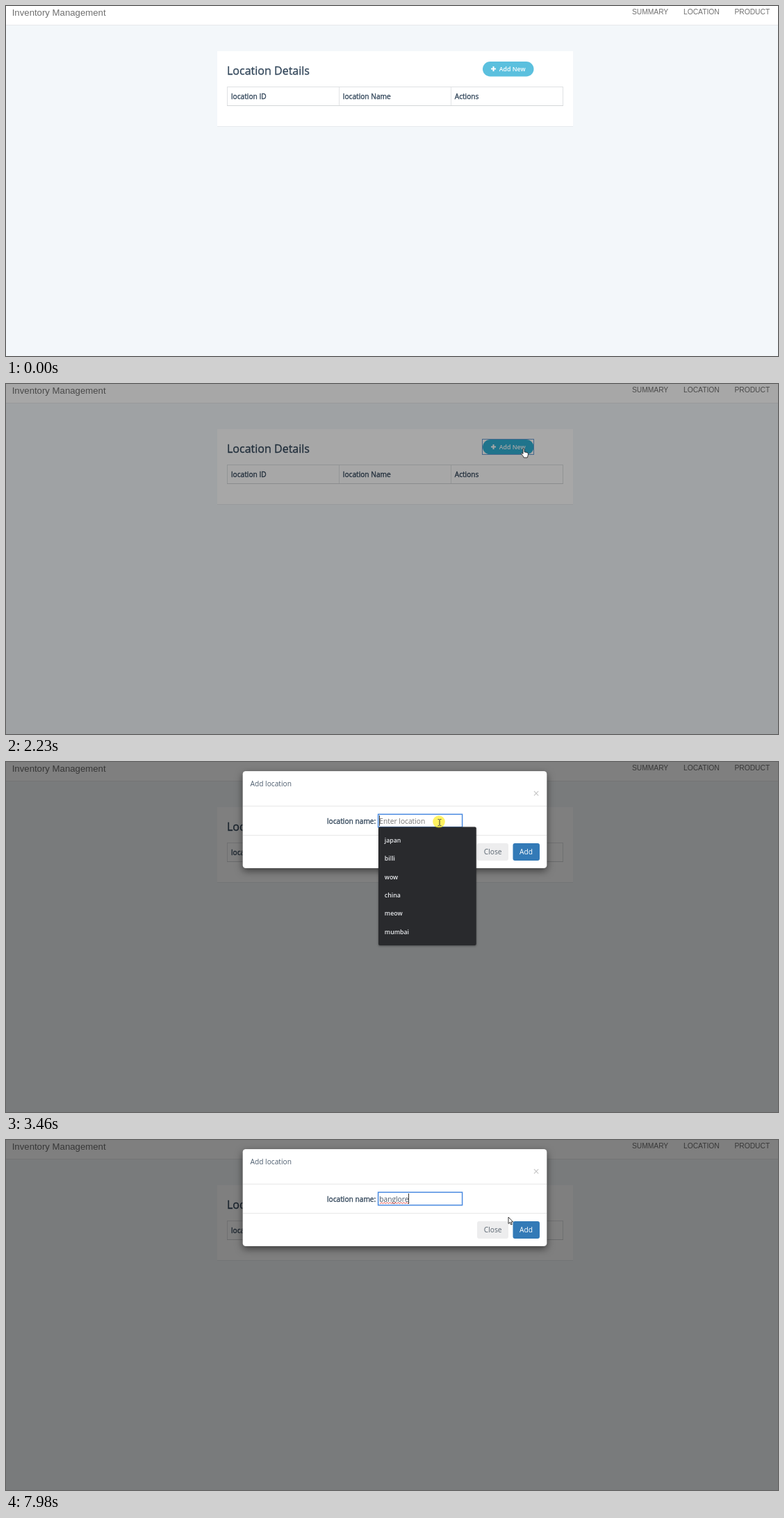
These frames come from a looping animation (1111x504 px, 8 s). An HTML page with a canvas:

```html
<!DOCTYPE html>
<html lang="en">
<head>
<meta charset="utf-8">
<title>Inventory Management</title>
<style>
  html, body { margin: 0; width: 100%; height: 100%; overflow: hidden; background: #f3f7fa; }
  canvas { display: block; }
</style>
</head>
<body>
<canvas id="stage" width="1111" height="504"></canvas>
<script>
const ctx = document.getElementById('stage').getContext('2d');
const LOOP = 8000;
const SANS = '"Open Sans", sans-serif';
const ARIAL = '"Liberation Sans", Arial, sans-serif';
const BASE = 10.2;
const INK = '#33475b';

const TYPED = [[4320, 'b'], [4470, 'ba'], [4620, 'ban'], [5170, 'bang'],
  [6030, 'bangl'], [6410, 'banglo'], [6730, 'banglor'], [6970, 'banglore']];
const CARET_OFF = [[4010, 4320], [5630, 6030], [7430, 7980]];
const SUGGESTIONS = ['japan', 'billi', 'wow', 'china', 'meow', 'mumbai'];
const FILTERED = ['billi', 'bhopal', 'bihar'];

const HAND = new Path2D('M-1 1q0-1.4 1-1.4q1 0 1 1.4v3.8l3.9.9q1.7.4 1.6 2l-.5 2.9-.8 2.4h-5' +
  'l-.8-1.8-2.6-3.3q-.6-1.2.5-1.6l1.7 1.3z');
const ARROW = new Path2D('M0 0V9.5L2.2 7.5 3.8 11 5.3 10.4 3.8 7H6.7Z');

const within = (t, a, b) => t >= a && t < b;
const clamp = v => Math.min(1, Math.max(0, v));
const smooth = u => u * u * (3 - 2 * u);

// Fraction of a move done at t, advancing in n equal jumps from start to end.
const jumps = (t, start, end, n) =>
  clamp((Math.floor((t - start) / (end - start) * (n - 1) + 0.05) + 1) / n);

// Latest repaint moment of a stepped transition.
const held = (t, start, end, n) => {
  const gap = (end - start) / (n - 1);
  return t < start ? 0 : start + Math.min(n - 1, Math.floor((t - start) / gap + 0.05)) * gap;
};

function rect(x, y, w, h, color) {
  ctx.fillStyle = color;
  ctx.fillRect(x, y, w, h);
}

function frame(x, y, w, h, color, line = 1) {
  ctx.strokeStyle = color;
  ctx.lineWidth = line;
  ctx.strokeRect(x, y, w, h);
}

function round(x, y, w, h, r, color) {
  ctx.fillStyle = color;
  ctx.beginPath();
  ctx.roundRect(x, y, w, h, r);
  ctx.fill();
}

function text(str, x, y, color, size = BASE, { family = SANS, weight = 400, thick = 0 } = {}) {
  ctx.font = `${weight} ${size}px ${family}`;
  ctx.fillStyle = color;
  ctx.fillText(str, x, y);
  if (thick) {
    ctx.strokeStyle = color;
    ctx.lineWidth = thick;
    ctx.strokeText(str, x, y);
  }
}

function shadow(color, blur, dy) {
  ctx.shadowColor = color;
  ctx.shadowBlur = blur;
  ctx.shadowOffsetY = dy;
}

function pointer(t) {
  if (t < 590) return null;
  if (t < 1130) {
    const pts = [[1030, 488], [974, 390], [930, 358], [903, 334], [896, 311]];
    const [x, y] = pts[Math.round(jumps(t, 590, 900, 5) * 5) - 1];
    return { x, y };
  }
  const glide = (from, to, u) => ({
    x: from[0] + (to[0] - from[0]) * u,
    y: from[1] + (to[1] - from[1]) * u
  });
  const button = [745, 93], field = [624, 87];
  if (t < 2760) return glide([896, 311], button, smooth(jumps(t, 1130, 1680, 8)));
  if (t < 7750) return glide(button, field, smooth(jumps(t, 2760, 3230, 7)));
  return glide(field, [723, 111], smooth(jumps(t, 7750, 7980, 4)));
}

function drawPage(t, hover) {
  rect(0, 0, 1111, 504, '#f3f7fa');
  rect(0, 0, 1111, 27, '#fff');
  rect(0, 27, 1111, 1, '#e7e9eb');
  text('Inventory Management', 8.7, 13.6, '#6f6f6f', 13.2, { family: ARIAL });
  [['SUMMARY', 901], ['LOCATION', 975], ['PRODUCT', 1048.5]].forEach(([label, x]) =>
    text(label, x, 12.3, '#6f6f6f', 10.25, { family: ARIAL }));

  rect(304, 65, 512, 108, '#fff');
  rect(304, 173, 512, 1, '#e6eaed');
  text('Location Details', 318, 98.5, INK, 16.05, { thick: 0.35 });

  frame(318.5, 116.5, 483, 27, '#dfe1e3');
  rect(318, 143, 484, 1, '#d4d6d8');
  [479, 640].forEach(x => rect(x, 117, 1, 26, '#e2e4e6'));
  [['location ID', 324], ['location Name', 484.8], ['Actions', 645.7]].forEach(([label, x]) =>
    text(label, x, 133.7, INK, BASE, { thick: 0.35 }));

  const pressed = within(t, 1910, 2140);
  round(686, 80, 73.5, 21.5, 10.75, pressed ? '#269abc' : hover ? '#31b0d5' : '#5bc0de');
  rect(698, 89.5, 7, 2, '#fff');
  rect(700.5, 87, 2, 7, '#fff');
  text('Add New', 709.8, 93.8, '#fff', 8.75, { weight: 600 });
  if (t >= 1910) frame(685.5, 79.5, 74, 22, '#6b9fd4');
}

function drawField(t) {
  const focus = t >= 3460;
  rect(535, 75, 122, 19, '#fff');
  if (focus) frame(535.6, 75.3, 121, 18.5, '#4a8ae0', 1.5);
  else frame(535.5, 75.5, 121, 18, '#a3a3a3');

  const entry = TYPED.filter(([at]) => t >= at).pop();
  const value = entry ? entry[1] : '';
  if (value) text(value, 537.3, 88.5, '#4b5866');
  else text('Enter location', 537.3, 88.5, '#777');

  if (t >= 7750) {
    ctx.strokeStyle = '#e8403c';
    ctx.lineWidth = 1;
    ctx.beginPath();
    for (let x = 538; x <= 580; x++) ctx.lineTo(x, 90.8 + (x % 4 < 2 ? -0.5 : 0.5));
    ctx.stroke();
  }
  if (focus && !CARET_OFF.some(([a, b]) => within(t, a, b))) {
    ctx.font = `${BASE}px ${SANS}`;
    const x = Math.round(537.2 + ctx.measureText(value).width);
    rect(x, 77, 1, 15, '#333');
  }
}

function drawModal(t) {
  const now = held(t, 2140, 2600, 7) - 2270;
  if (now <= 0) return;
  ctx.save();
  ctx.globalAlpha = clamp(now / 150);
  ctx.translate(0, Math.round(-35 * (1 - clamp(now / 300)) ** 1.75));

  ctx.save();
  shadow('rgba(0,0,0,.5)', 11, 4);
  round(340.5, 13, 438, 140, 4.4, '#fff');
  ctx.restore();
  ctx.strokeStyle = 'rgba(0,0,0,.2)';
  ctx.lineWidth = 0.8;
  ctx.stroke();

  text('Add location', 351.5, 35.2, '#4d5d6e');
  text('×', 758.4, 50.6, '#c6c6c6', 16);
  rect(341, 63, 437, 1, '#e7e7e7');
  rect(341, 105, 437, 1, '#e7e7e7');
  text('location name:', 462, 88.5, INK, BASE, { thick: 0.35 });
  drawField(t);

  round(678, 117, 45, 25, 3, '#ededee');
  text('Close', 687.8, 133, '#5a6570');
  round(729.5, 117, 38.5, 25, 3, t < 2760 ? '#286090' : '#337ab7');
  text('Add', 739, 133, '#fff');
  ctx.restore();
}

function drawSuggestions(t) {
  if (!within(t, 3460, 4470)) return;
  const items = t < 4320 ? SUGGESTIONS : FILTERED;
  ctx.save();
  shadow('rgba(0,0,0,.4)', 3, 1);
  round(536, 93.5, 140.7, 12.2 + 26.4 * items.length, 2, '#292a2d');
  ctx.restore();
  items.forEach((item, i) =>
    text(item, 544.8, 116 + 26.35 * i, '#e8eaed', 8.75, { weight: 600 }));
}

function drawGlow(x, y) {
  ctx.fillStyle = 'rgba(255,235,0,.62)';
  ctx.beginPath();
  ctx.arc(x, y, 8.8, 0, 7);
  ctx.fill();
}

function drawPointer(p, shape) {
  ctx.save();
  ctx.translate(p.x, p.y);
  if (shape === 'beam') {
    rect(-0.5, -4, 1, 8.5, '#333');
    rect(-2.5, -5, 2, 1, '#555');
    rect(0.5, -5, 2, 1, '#555');
    rect(-2.5, 4, 2, 1, '#555');
    rect(0.5, 4, 2, 1, '#555');
  } else {
    const path = shape === 'hand' ? HAND : ARROW;
    ctx.fillStyle = '#fff';
    ctx.strokeStyle = '#222';
    ctx.lineWidth = 0.9;
    ctx.lineJoin = 'round';
    ctx.fill(path);
    ctx.stroke(path);
  }
  ctx.restore();
}

function draw(t) {
  const p = pointer(t);
  const onButton = !!p && t < 2760 && within(p.x, 686, 760) && within(p.y, 80, 102);
  const onField = !!p && t >= 2760 && within(p.x, 535, 657) && within(p.y, 75, 94);

  drawPage(t, onButton);
  const dim = 0.5 * clamp((held(t, 2140, 2600, 7) - 2113) / 150);
  if (dim) rect(0, 0, 1111, 504, `rgba(0,0,0,${dim})`);
  drawModal(t);
  drawSuggestions(t);

  if (within(t, 1910, 2140)) drawGlow(745, 93);
  if (within(t, 3460, 3690)) drawGlow(623, 86);
  if (p) drawPointer(p, onButton ? 'hand' : onField ? 'beam' : 'arrow');
}

const start = performance.now();
function tick() {
  draw((performance.now() - start) % LOOP);
  requestAnimationFrame(tick);
}
tick();
</script>
</body>
</html>
```
